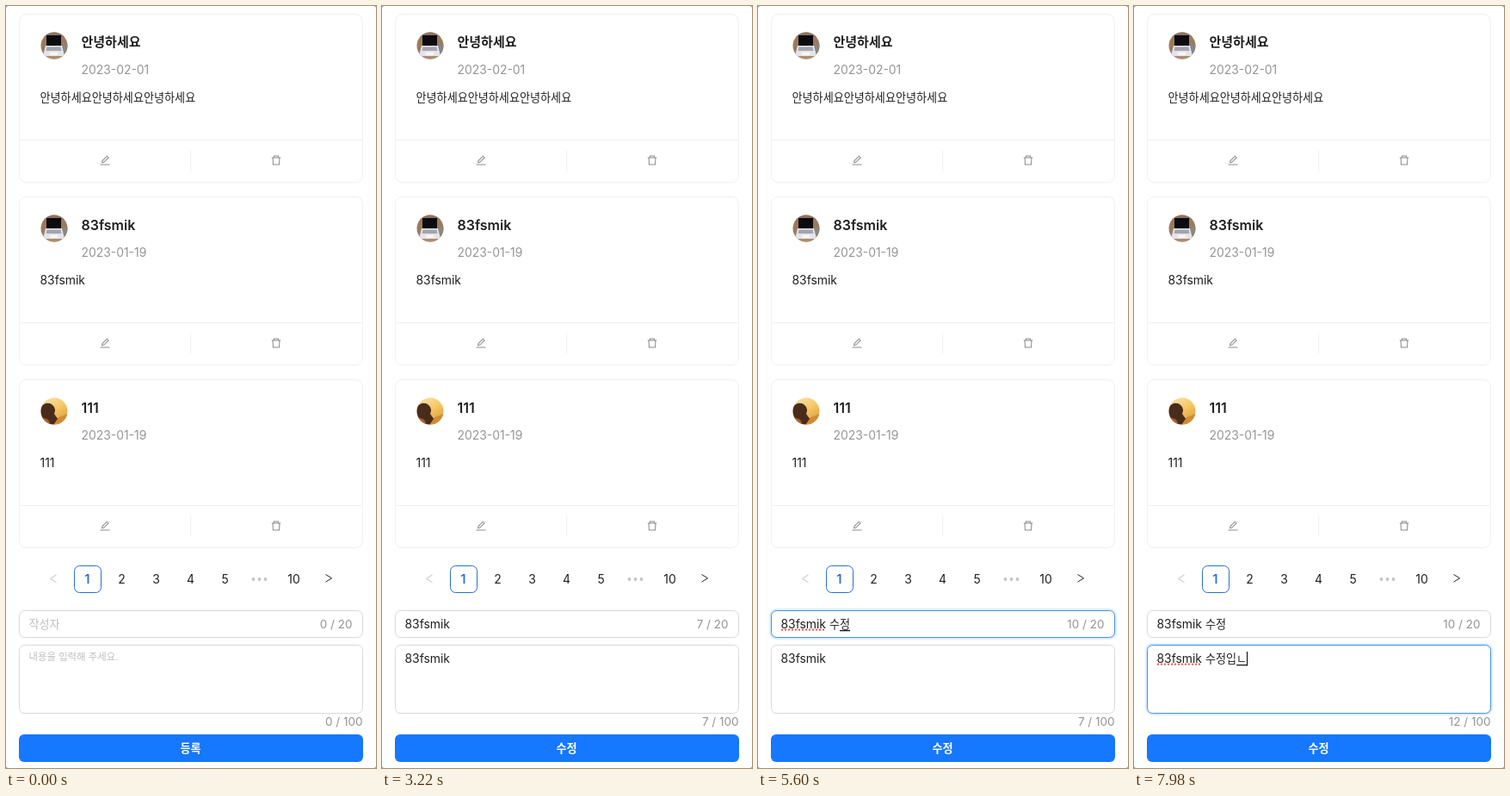
Animation of 430 by 884 pixels, one loop 8000 ms. Source, as an HTML page:

```html
<!DOCTYPE html>
<html lang="ko">
<head>
<meta charset="utf-8">
<title>방명록</title>
<style>
html, body { margin: 0; width: 100%; height: 100%; overflow: hidden; background: #fff; }
svg { display: block; width: 430px; height: 884px; }
text { font: 13.9px Inter, "Noto Sans CJK KR", sans-serif; fill: #1f1f1f; white-space: pre; }
.ko { font-size: 13.1px; }
.bold { font-weight: 600; }
.title { font-size: 16px; font-weight: 600; }
.title.ko { font-size: 15px; }
.dim { fill: #949494; }
.hint { fill: #bfbfbf; }
.small { font-size: 11.4px; }
.mid { text-anchor: middle; }
.end { text-anchor: end; font-size: 13.5px; }
.icon { fill: none; stroke: #8c8c8c; stroke-width: 76; }
</style>
</head>
<body>
<svg id="stage" viewBox="0 0 430 884"></svg>
<script>
const LOOP = 8000, NAME = '83fsmik', FILL = 2870;
const svg = document.getElementById('stage');

const text = (x, y, s, cls = '', id = '') =>
  `<text x="${x}" y="${y}" class="${cls}" ${id && `id="${id}"`}>${s}</text>`;
const box = (x, y, w, h, r, attrs) =>
  `<rect x="${x}" y="${y}" width="${w}" height="${h}" rx="${r}" ${attrs}/>`;
const line = (d, color) => `<path d="${d}" fill="none" stroke="${color}"/>`;
const icon = (x, y, d) =>
  `<path class="icon" transform="translate(${x} ${y}) scale(${14 / 1024})" d="${d}"/>`;

const PENCIL = 'M268 708L296 556 688 164 811 288 420 680ZM112 874H912';
const BIN = 'M128 290H896M318 280V148H706V280M226 300L252 876H772L798 300';

const laptop = `
  <rect width="32" height="32" fill="#9c7a5c"/>
  <path d="M0 0H32V6H0Z" fill="#8b735e"/>
  <path d="M25 15H32V25H25Z" fill="#8a8783"/>
  <path d="M7 4H24V16H7Z" fill="#0c0b10"/>
  <path d="M6 16H25L28 28H3Z" fill="#e4e4ea"/>
  <path d="M7.5 17.5H23.5L24.5 22H6.5Z" fill="#a3a4ae"/>
  <path d="M11 23.5H20V27H11Z" fill="#f6f6f8"/>
  <path d="M2 28H30V32H2Z" fill="#b08d6c"/>`;
const sunset = `
  <rect width="32" height="32" fill="url(#sky)"/>
  <path d="M14 26L32 19V32H14Z" fill="#d08a3a"/>
  <path d="M0 14C2 7 8 5 13 8C17 11 18 15 16 19L20 25L15 32H0Z" fill="#4a2c1c"/>
  <path d="M0 22L9 26L12 32H0Z" fill="#a8652c"/>`;

function card(y, title, date, body, photo, cls = '') {
  return box(15.5, y, 399, 195, 8, 'fill="#fff" stroke="#f0f0f0"') +
    `<g transform="translate(40 ${y + 20.5})" clip-path="url(#round)">${photo}</g>` +
    text(87.5, y + (cls ? 37.8 : 38.3), title, 'title ' + cls) +
    text(87.5, y + 69.5, date, 'dim') +
    text(39.5, y + (cls ? 101.2 : 101.5), body, cls) +
    line(`M15 ${y + 146}H415M214.5 ${y + 158}V${y + 182.5}`, '#f0f0f0') +
    icon(108, y + 162.5, PENCIL) + icon(307, y + 162.5, BIN);
}

function field(id, y, h) {
  return box(14.5, y - 0.5, 401, h + 1, 7, `id="${id}Glow" fill="none" stroke="#0591ff" stroke-width="3"`) +
    box(15.5, y + 0.5, 399, h - 1, 6, `id="${id}Box" fill="#fff"`);
}

function typed(id, y) {
  return `<text id="${id}" x="26.5" y="${y}"><tspan></tspan><tspan class="ko"></tspan></text>
    <path id="${id}Spell" stroke="#e8584c" stroke-width="2.4" stroke-linecap="round" stroke-dasharray="0 4"/>
    <path id="${id}Compose" stroke="#1f1f1f" stroke-width="1.4"/>
    <path id="${id}Caret" stroke="#000"/>`;
}

const pages = [2, 3, 4, 5].map((n, i) => text(134.5 + 40 * i, 670, n, 'mid')).join('');
const dots = [287.5, 294.5, 301.5].map(x => `<circle cx="${x}" cy="665" r="1.9" fill="#c4c4c4"/>`).join('');

svg.innerHTML = `
  <defs>
    <clipPath id="round"><circle cx="16" cy="16" r="15.5"/></clipPath>
    <linearGradient id="sky" x1="0" y1="0" x2="0.6" y2="1">
      <stop offset="0" stop-color="#f6e6bd"/><stop offset="0.5" stop-color="#f8cc6c"/>
      <stop offset="1" stop-color="#e0a03c"/>
    </linearGradient>
  </defs>
  <rect width="430" height="884" fill="#777"/>
  ${box(0, 0, 430, 884, 2.5, 'fill="#fff"')}
  ${card(9.5, '안녕하세요', '2023-02-01', '안녕하세요'.repeat(3), laptop, 'ko')}
  ${card(221.5, NAME, '2023-01-19', NAME, laptop)}
  ${card(433.5, '111', '2023-01-19', '111', sunset)}
  ${line('M58.5 660L51.5 664.3 58.5 668.6', '#c4c4c4')}
  ${box(79.5, 649.5, 31, 31, 6, 'fill="#fff" stroke="#2a6fcb"')}
  <text x="94.5" y="670" class="bold mid" style="fill:#1f6cdc">1</text>
  ${pages}${dots}${text(334.5, 670, 10, 'mid')}
  ${line('M371.5 659.5L378.5 663.8 371.5 668.1', '#222')}
  ${field('author', 701, 32)}${field('memo', 741, 80)}
  ${text(26.5, 721.5, '작성자', 'ko hint', 'authorHint')}
  ${text(26.5, 759, '내용을 입력해 주세요.', 'small hint', 'memoHint')}
  ${typed('author', 722)}${typed('memo', 762)}
  ${text(402.5, 722, '', 'dim end', 'authorCount')}
  ${text(414.5, 835, '', 'dim end', 'memoCount')}
  ${box(15, 845, 400, 32, 6, 'fill="#1677ff"')}
  <text id="button" x="214.5" y="865.8" class="ko bold mid" style="fill:#fff"></text>`;

const el = {};
svg.querySelectorAll('[id]').forEach(e => el[e.id] = e);

// Hangul built up one keystroke at a time, after the space
const STROKES = ['', 'ㅅ', '수', '숮', '수저', '수정', '수정ㅇ', '수정이', '수정입', '수정입ㄴ'];

const FIELDS = [
  { id: 'author', base: 722, max: 20, focus: 3630, blur: 6090,
    keys: [4340, 4620, 4690, 4830, 4970, 5110],
    border: [3430, 6060, 260], glow: [3590, 6020, 140] },
  { id: 'memo', base: 762, max: 100, focus: 6150, blur: LOOP,
    keys: [6790, 7000, 7070, 7140, 7210, 7280, 7560, 7630, 7770, 7980],
    border: [6000, LOOP, 200], glow: [6150, LOOP, 200] }
];

function ease(t, start, span) {
  const k = Math.min(1, Math.max(0, (t - start) / span));
  return k * k * (3 - 2 * k);
}
const fade = (t, [on, off, offSpan]) => ease(t, on, 200) - ease(t, off, offSpan);
const mix = (a, b, k) => `rgb(${a.map((v, i) => Math.round(v + (b[i] - v) * k))})`;
const show = (e, on) => e.setAttribute('visibility', on ? 'visible' : 'hidden');

function drawField(f, t) {
  const part = name => el[f.id + name];
  const pressed = f.keys.filter(k => k <= t);
  const active = t >= f.focus && t < f.blur;
  const filled = t >= FILL;
  const latin = filled ? NAME + (pressed.length ? ' ' : '') : '';
  const hangul = pressed.length ? STROKES[pressed.length - 1] : '';

  const [a, b] = part('').children;
  a.textContent = latin;
  b.textContent = hangul;
  part('Count').textContent = `${latin.length + hangul.length} / ${f.max}`;
  show(part('Hint'), !filled);

  part('Box').setAttribute('stroke', mix([217, 217, 217], [70, 144, 226], fade(t, f.border)));
  part('Glow').setAttribute('stroke-opacity', 0.15 * fade(t, f.glow));

  const left = 26.5;
  const end = left + part('').getComputedTextLength();
  const since = t - (pressed.length ? pressed[pressed.length - 1] : f.focus);
  const x = Math.round(end) + 0.5;
  part('Caret').setAttribute('d', `M${x} ${f.base - 13}v16.5`);
  show(part('Caret'), active && since % 1000 < 490);

  const marked = active && pressed.length > 0;
  if (marked) {
    const word = part('').getSubStringLength(0, NAME.length);
    part('Spell').setAttribute('d', `M${left + 1.5} ${f.base + 1.6}h${word - 2}`);
  }
  show(part('Spell'), marked);
  part('Compose').setAttribute('d', `M${end - 12} ${f.base + 2.6}H${end}`);
  show(part('Compose'), marked && hangul);
}

function draw(t) {
  FIELDS.forEach(f => drawField(f, t));
  el.button.textContent = t < FILL ? '등록' : '수정';
}

const start = performance.now();
function tick() {
  draw((performance.now() - start) % LOOP);
  requestAnimationFrame(tick);
}
tick();
</script>
</body>
</html>
```
